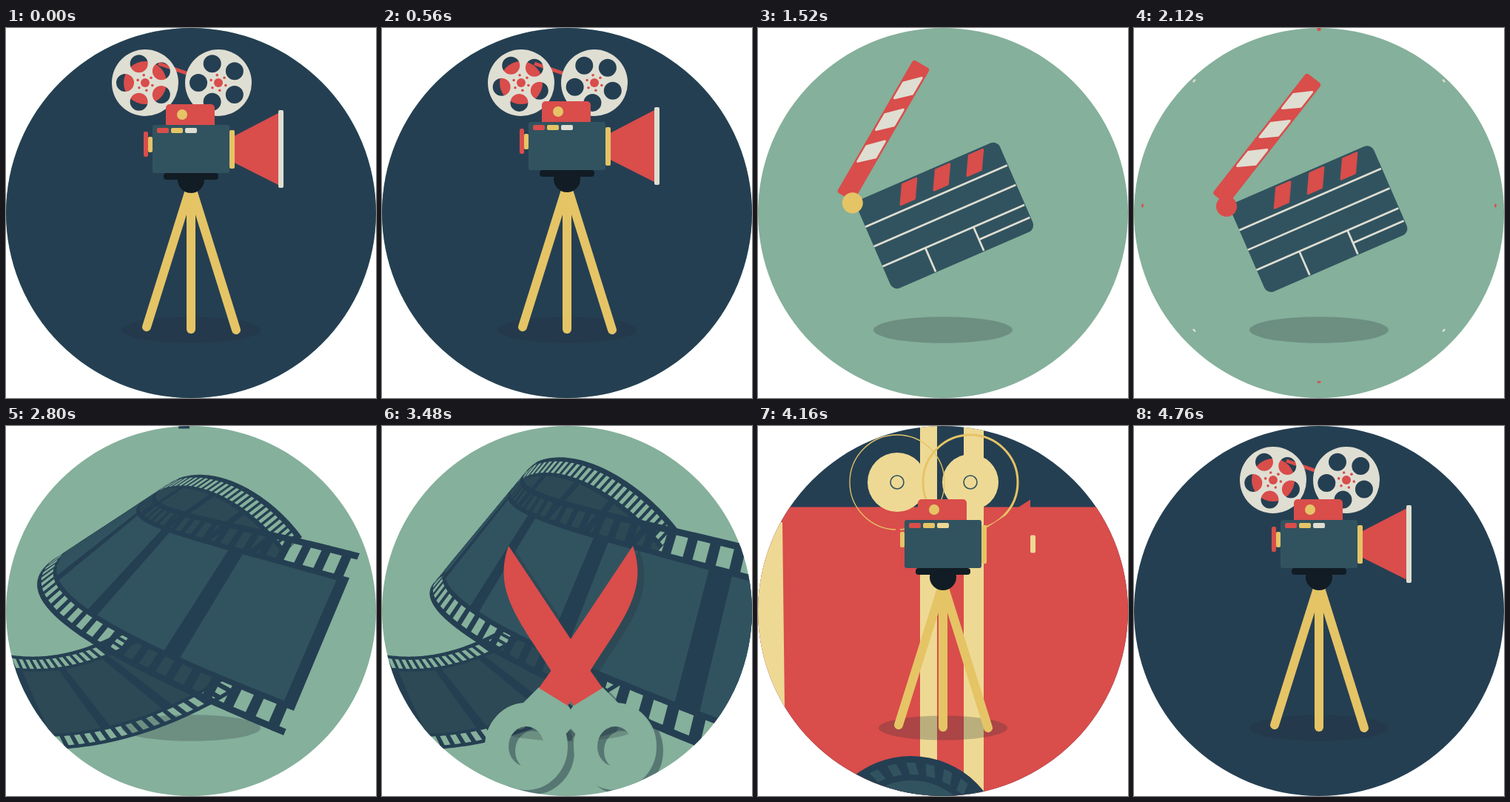
An HTML page with a canvas for the animation above (4840 ms loop, 500 by 500 pixels).

```html
<!DOCTYPE html>
<html lang="en">
<head>
<meta charset="utf-8">
<title>Film making loop</title>
<style>
html, body { margin: 0; width: 100%; height: 100%; overflow: hidden; background: #fff; }
canvas { display: block; width: 500px; height: 500px; }
</style>
</head>
<body>
<canvas id="stage" width="500" height="500"></canvas>
<script>
const LOOP = 4840, RAD = Math.PI / 180;
const NAVY = '#253f52', TEAL = '#31535f', GREEN = '#85b09b', RED = '#d94d4b',
  YELLOW = '#e5c466', CREAM = '#eed994', WHITE = '#dfded2', BLACK = '#111c24',
  SHADE = 'rgba(32,45,56,.25)';
const c = document.getElementById('stage').getContext('2d');

const clamp = (v, a = 0, b = 1) => Math.min(b, Math.max(a, v));
const mix = (a, b, k) => a + (b - a) * k;

// Eased value from time/value pairs.
function key(t, ...k) {
  if (t <= k[0]) return k[1];
  for (let i = 2; i < k.length; i += 2) {
    if (t < k[i]) {
      const p = (t - k[i - 2]) / (k[i] - k[i - 2]);
      return mix(k[i - 1], k[i + 1], p * p * (3 - 2 * p));
    }
  }
  return k[k.length - 1];
}

function disc(x, y, r, fill, ry = r) {
  c.beginPath();
  c.ellipse(x, y, Math.max(0, r), Math.max(0, ry), 0, 0, 7);
  c.fillStyle = fill;
  c.fill();
}
function ring(x, y, r, width, color) {
  c.beginPath();
  c.arc(x, y, r, 0, 7);
  c.lineWidth = width;
  c.strokeStyle = color;
  c.stroke();
}
function box(x, y, w, h, fill, r = 0) {
  c.beginPath();
  c.roundRect(x, y, w, h, r);
  c.fillStyle = fill;
  c.fill();
}
function poly(fill, ...p) {
  c.beginPath();
  for (let i = 0; i < p.length; i += 2) c.lineTo(p[i], p[i + 1]);
  c.closePath();
  c.fillStyle = fill;
  c.fill();
}
function line(x1, y1, x2, y2, width, color, p = 1) {
  if (p <= 0) return;
  c.beginPath();
  c.moveTo(x1, y1);
  c.lineTo(mix(x1, x2, p), mix(y1, y2, p));
  c.lineWidth = width;
  c.strokeStyle = color;
  c.stroke();
}
function group(x, y, angle, sx, sy, draw) {
  if (sx <= 0 || sy <= 0) return;
  c.save();
  c.translate(x, y);
  c.rotate(angle * RAD);
  c.scale(sx, sy);
  draw();
  c.restore();
}
const shadow = rx => disc(250, 408, rx, SHADE, rx * .19);

/* Camera */
function reel(x, y, r, angle, hole, face, film, hub) {
  if (film) disc(x, y, Math.min(r, 29) * hole / 12, RED);
  c.beginPath();
  c.arc(x, y, r, 0, 7);
  for (let i = 0; i < 5; i++) {
    const a = (angle + i * 72) * RAD;
    const hx = x + 27 * Math.cos(a), hy = y + 27 * Math.sin(a);
    c.moveTo(hx + hole, hy);
    c.arc(hx, hy, hole, 0, 7);
  }
  c.fillStyle = face;
  c.fill('evenodd');
  if (hub < 1) ring(x, y, 9, 1.6, TEAL);
  disc(x, y, 6 * hub, RED);
  for (let i = 0; i < 6; i++) {
    const a = (angle + i * 60 + 20) * RAD;
    disc(x + 10.5 * Math.cos(a), y + 10.5 * Math.sin(a), 1.8 * hub, RED);
  }
}

function tripod() {
  c.lineCap = 'round';
  for (const [x, y] of [[190, 404], [311, 408], [250, 407]]) line(250, 213, x, y, 12, YELLOW);
  c.lineCap = 'butt';
}

function cameraBody(cone, bar, barColor) {
  box(186, 140, 6, 34, RED, 2);
  box(192, 147, 6, 21, YELLOW, 2);
  if (cone > 0) {
    poly(RED, 305, 164 - 16 * cone / 48, 368, 163.5 - cone, 368, 163.5 + cone, 305, 164 + 16 * cone / 48);
    box(368, 163.5 - bar, 7, bar * 2, barColor, 2);
  }
  box(302, 138, 7, 52, YELLOW, 2);
  box(216, 103, 66, 34, RED, 5);
  disc(238, 117, 7, YELLOW);
  box(198, 131, 104, 65, TEAL, 3);
  [RED, YELLOW, barColor].forEach((color, i) => box(204 + i * 19, 135, 16, 7, color, 2));
}

function camera(t) {
  const end = t > 3000, u = end ? t - LOOP : t;
  const settled = !end || t > 4500;
  const bob = settled ? -2 + 2 * Math.cos(u * Math.PI / 80) : -4;
  const leave = end ? 1 : key(t, 620, 1, 960, 0);
  const fall = end ? 0 : key(t, 600, 0, 1040, 1);
  const lift = t < 600 || settled ? bob : end ? -4 : bob * (1 - fall);
  const cone = end ? key(t, 4040, 0, 4160, 60, 4280, 48) : 48.5 * leave;
  const bar = end ? key(t, 4100, 0, 4160, 12, 4300, 52.5) : 52.5 * leave;
  const face = end && t < 4230 ? CREAM : WHITE;
  const hole = end ? key(t, 4180, 0, 4380, 12) : 12;
  const hub = end ? key(t, 4180, 0, 4320, 1) : 1;
  const angle = 180 + u * .106;

  group(250, 408, 0, 1, leave, () => {
    c.translate(-250, -408);
    tripod();
    box(213, 196 + lift, 74, 9, BLACK, 4);
    disc(250, 205 + lift / 4, 18, BLACK);
  });
  const gone = end ? 1 : key(t, 1040, 1, 1180, 0);
  const ry = (end ? key(t, 4160, 76, 4400, 73, 4760, 73, 4840, 74) : 74) + fall * 128;
  group(238, 203, 0, gone, gone, () => {
    c.translate(-238, -203);
    line(206, ry - 26, 244, ry - 13, 5, RED, end ? key(t, 4300, 0, 4460, 1) : 1);
    const r1 = end ? key(t, 4020, 0, 4160, 40, 4280, 45) : 45;
    const r2 = end ? key(t, 4030, 0, 4160, 38, 4290, 45) : 45;
    reel(188, ry, r1, angle, hole, face, true, hub);
    reel(287, ry, r2, angle, hole, face, false, hub);
    if (end && t < 4280) {
      const k = key(t, 4040, .4, 4160, 1, 4280, 1.15);
      ring(188, ry, 64 * k, key(t, 4040, 7, 4160, 1.3, 4200, .01), YELLOW);
      ring(287, ry, 64 * k, key(t, 4040, 10, 4160, 3, 4260, .01), YELLOW);
    }
    c.translate(0, lift + fall * 96);
    cameraBody(cone, bar, face);
  });
}

/* Clapperboard */
function slant(fill, x1, x2, y, x3, x4, y2) {
  c.lineJoin = 'round';
  poly(fill, x1, y, x2, y, x4, y2, x3, y2);
  c.lineWidth = 3;
  c.strokeStyle = fill;
  c.stroke();
}

function clapper(t) {
  const x = key(t, 520, 150, 1040, 139, 1400, 128, 2120, 125, 2160, 125, 2340, 231);
  const y = key(t, 520, 560, 900, 196, 1040, 214, 1400, 236, 2120, 241, 2160, 241, 2340, 179);
  const tilt = key(t, 520, 24, 1040, -11, 1300, -17, 1640, -26, 1760, -10, 2000, -23.5);
  const open = key(t, 700, 0, 1040, 17, 1360, 34, 1640, 38, 1740, 0, 1800, 0, 2040, 28.5);
  const size = key(t, 520, .8, 1040, .925, 1280, 1, 2160, 1, 2340, 0);
  const grow = (a, b) => clamp((t - a) / (b - a));
  group(x, y, tilt, size, size, () => {
    box(3, 0, 210, 131, TEAL, 10);
    for (let i = 0; i < 3; i++) {
      const d = i * 49;
      slant(RED, 72 + d, 92 + d, 4, 59 + d, 79 + d, 28);
    }
    const ink = (x1, y1, x2, y2, p) => line(x1, y1, x2, y2, 2.7, WHITE, p);
    ink(3, 36.5, 212, 36.5, grow(840, 1000));
    ink(3, 65.5, 212, 65.5, grow(860, 1050));
    ink(3, 95, 212, 95, grow(880, 1080));
    ink(66, 95, 66, 130, grow(980, 1070));
    ink(137, 95, 137, 130, grow(1060, 1140));
    ink(137, 113.5, 212, 113.5, grow(1120, 1220));
    group(0, 0, -open, 1, 1, () => {
      box(2, -26, 207, 26, RED, 4);
      for (let i = 0; i < 3; i++) {
        const d = i * 49.5;
        slant(WHITE, 52 + d, 76 + d, -22, 69 + d, 94 + d, -4);
      }
    });
    disc(0, 0, 14, t < 1700 ? YELLOW : RED);
  });
}

/* Swirl and scraps thrown out when the camera leaves */
function swirl(t) {
  const k = key(t, 780, .1, 1040, 1, 1260, 2.2);
  if (t < 780 || t > 1260) return;
  group(250, 250, key(t, 780, -110, 1040, 0, 1260, 60), k, k, () => {
    c.translate(-250, -250);
    c.strokeStyle = YELLOW;
    c.lineWidth = 12 / Math.max(k, .6);
    c.beginPath();
    c.moveTo(170, 8);
    c.bezierCurveTo(210, 85, 170, 172, 8, 181);
    c.moveTo(286, 133);
    c.bezierCurveTo(310, 210, 370, 295, 488, 334);
    c.stroke();
  });
}

function scraps(t) {
  if (t < 860 || t > 1420) return;
  const k = key(t, 860, .2, 1040, 1, 1420, 1.6), s = key(t, 1040, 1, 1420, 0);
  const bit = (x, y, a, draw) => group(250 + (x - 250) * k, 250 + (y - 250) * k, a, s, s, draw);
  bit(374, 49, 20, () => box(-3, -2.5, 6, 5, RED));
  bit(356, 116, -50, () => box(-4, -2.5, 8, 5, YELLOW, 2));
  bit(58, 273, 0, () => box(-4, -2.5, 8, 5, YELLOW, 2));
  bit(82, 190, 20, () => box(-4, -3, 8, 5, NAVY));
  bit(170, 373, 0, () => poly(WHITE, 13, -18, -8, 18, -13, 13));
  bit(265, 168, 0, () => poly(WHITE, -1, -11, 3, 13, -2, 13));
}

function burst(t) {
  if (t < 1740 || t > 2160) return;
  const p = (t - 1740) / 420, e = 1 - (1 - p) ** 2;
  for (let i = 0; i < 8; i++) {
    group(250, 240, i * 45 - 90, 1, 1, () => {
      const far = mix(90, 241, e);
      box(far - 26 * (1 - p), -2.5, 26 * (1 - p), 5, i % 2 ? WHITE : RED, 2);
    });
  }
  if (t > 2080) box(247.5, 0, 5, 4, RED, 2);
}

/* Film */
function bez(p, s) {
  const r = 1 - s, w = [r * r * r, 3 * r * r * s, 3 * r * s * s, s * s * s];
  let x = 0, y = 0;
  w.forEach((k, i) => { x += k * p[2 * i]; y += k * p[2 * i + 1]; });
  return [x, y];
}

// A perforated strip ruled between two curves, shown from a to b.
function strip(top, low, a, b, phase, tint) {
  const h = .039;
  const at = (s, v) => {
    const p = bez(top, s), q = bez(low, s);
    return [mix(p[0], q[0], v), mix(p[1], q[1], v)];
  };
  const cell = (s0, s1, v0, v1) => {
    s0 = clamp(s0, a, b);
    s1 = clamp(s1, a, b);
    if (s1 <= s0) return;
    const m = (s0 + s1) / 2;
    c.moveTo(...at(s0, v0));
    c.lineTo(...at(m, v0));
    c.lineTo(...at(s1, v0));
    c.lineTo(...at(s1, v1));
    c.lineTo(...at(m, v1));
    c.lineTo(...at(s0, v1));
    c.closePath();
  };
  for (let i = Math.floor((a - phase) / h); i <= Math.ceil((b - phase) / h); i++) {
    const s = phase + i * h, l = s - h / 2, r = s + h / 2 + .002;
    c.beginPath();
    cell(l, r, 0, 1);
    cell(s - h * .28, s + h * .28, .035, .135);
    cell(s - h * .28, s + h * .28, .865, .965);
    c.fillStyle = NAVY;
    c.fill('evenodd');
    if (i % 6) {
      c.beginPath();
      cell(l - .002, r, .165, .835);
      c.fillStyle = tint;
      c.fill();
    }
  }
}

const blend = (p, q, k) => p.map((v, i) => mix(v, q[i], k));
function film(t) {
  if (t < 2280 || t > 3960) return;
  const k = key(t, 2800, 0, 3480, 1);
  const phase = mix(1, .92, k);
  const top = blend([235, 70, 150, 112, 230, 108, 478, 172], [210, 48, 150, 90, 225, 95, 540, 172], k);
  const low = blend([76, 173, -20, 225, 90, 300, 375, 418], [92, 198, 0, 235, 140, 320, 480, 455], k);
  const rim = blend([235, 70, 290, 52, 360, 95, 400, 150], [210, 48, 265, 25, 350, 75, 400, 140], k);
  const back = blend([76, 173, 120, 165, 190, 225, 240, 290], [92, 198, 130, 180, 200, 235, 250, 300], k);
  const drop = clamp((t - 3620) / 340) ** 2;
  const p1 = key(t, 2280, 0, 2480, 1), p2 = key(t, 2440, 0, 2600, 1);
  const p3 = key(t, 2560, 0, 2800, 1);
  const cut = .7;

  group(-330 * drop, 480 * drop, -25 * drop, 1, 1, () => {
    if (p1 > 0) {
      strip([-60, 290, 20, 325, 90, 317, 170, 270], [-40, 425, 70, 455, 200, 430, 330, 345],
        0, p1, .53, '#2d4955');
    }
    if (p2 > 0) strip(rim, back, 1 - p2, 1, .4, '#2d4955');
    if (p3 > 0) strip(top, low, 0, drop ? cut : p3, phase, TEAL);
  });
  if (drop) {
    group(260 * drop, 480 * drop, 16 * drop, 1, 1, () => strip(top, low, cut, 1, phase, TEAL));
  }
  if (t > 2700 && t < 2880) box(233, 0, 15, 3.5, NAVY, 1);
}

/* Scissors */
function scissorHalf(side, close, flat) {
  c.save();
  c.translate(255, 328);
  c.scale(side, 1);
  c.rotate(close * RAD);
  c.lineWidth = 32;
  c.strokeStyle = flat || GREEN;
  c.beginPath();
  c.ellipse(60, 105, 40, 43, 0, 0, 7);
  c.stroke();
  poly(flat || GREEN, 4, 49, 43, 25, 68, 50, 52, 80, 10, 92, -10, 70);
  c.beginPath();
  c.moveTo(-84, -166);
  c.bezierCurveTo(-106, -105, -68, -63, -27, 2);
  c.lineTo(4, 50);
  c.lineTo(43, 26);
  c.lineTo(26, 2);
  c.lineTo(0, -40);
  c.closePath();
  c.fillStyle = flat || RED;
  c.fill();
  c.restore();
}

function scissors(t) {
  if (t < 2960 || t > 3920) return;
  const y = key(t, 2960, 350, 3360, 0, 3500, 0, 3620, -50, 3700, -50, 3920, 380);
  const close = key(t, 3040, 20, 3340, -3, 3480, 0, 3620, 27, 3700, 27, 3800, 0);
  for (const [dx, dy, flat] of [[9, 6, 'rgb(43,65,76)'], [0, 0, '']]) {
    c.save();
    c.translate(dx, y + dy);
    if (flat) c.globalAlpha = .5;
    scissorHalf(1, close, flat);
    scissorHalf(-1, close, flat);
    c.restore();
  }
}

/* Striped red wipe and film roll */
function redWipe(t) {
  if (t < 3920 || t > 4400) return;
  const y = key(t, 3920, 510, 4060, -10, 4090, -10, 4230, 224, 4380, 510);
  box(0, y, 500, 510, RED);
  const w = key(t, 3960, 0, 4100, 1, 4160, 1, 4340, 0);
  poly(CREAM, -5, 130, 33 * w, 130, 36 * w, 380, -5, 380);
  box(230.5 - 11.5 * w, 0, 23 * w, 500, CREAM);
  box(291.5 - 13.5 * w, 0, 27 * w, 500, CREAM);
}

function roll(t) {
  if (t < 3960 || t > 4360) return;
  const y = key(t, 3960, 720, 4100, 555, 4160, 571, 4360, 720);
  group(207, y, (t - 4160) * .2, 1, 1, () => {
    disc(0, 0, 125, NAVY);
    for (let i = 0; i < 28; i++) {
      c.rotate(Math.PI / 14);
      poly(TEAL, -7, -116, 5, -116, 10, -100, -2, -100);
    }
    disc(0, 0, 92, TEAL);
  });
}

function render(t) {
  c.clearRect(0, 0, 500, 500);
  c.save();
  c.beginPath();
  c.arc(250, 250, 250, 0, 7);
  c.clip();
  const early = t < 1260, late = t > 4075;
  box(0, 0, 500, 500, late ? NAVY : GREEN);
  if (early) disc(250, 254, key(t, 820, 256, 1040, 177, 1260, 0), NAVY);
  redWipe(t);
  shadow(late ? key(t, 4075, 60, 4160, 87, 4260, 94) : 94);
  swirl(t);
  if (t < 1200 || t > 4020) {
    const pop = t > 4000 ? key(t, 4020, .3, 4140, 1) : 1;
    group(250, 408, 0, pop, pop, () => {
      c.translate(-250, -408);
      camera(t);
    });
  }
  scraps(t);
  burst(t);
  if (t > 520 && t < 2340) clapper(t);
  film(t);
  scissors(t);
  roll(t);
  c.restore();
}

const start = performance.now();
function tick() {
  render((performance.now() - start) % LOOP);
  requestAnimationFrame(tick);
}
tick();
</script>
</body>
</html>
```
